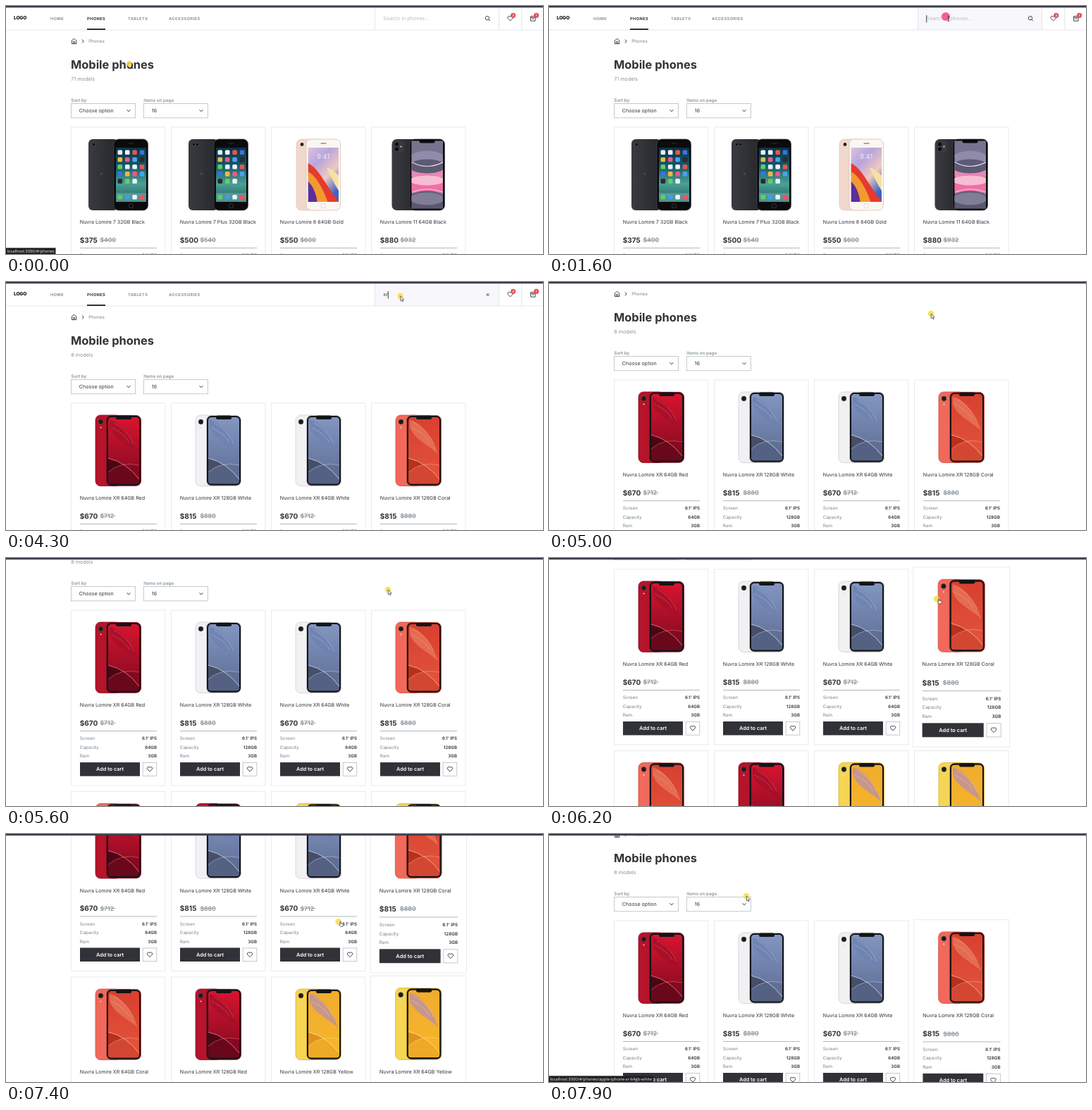
An HTML page that plays this animation: 762x352 px, repeating every 8 s.

```html
<!DOCTYPE html>
<html lang="en">
<head>
<meta charset="utf-8">
<title>Mobile phones</title>
<style>
html, body { margin: 0; width: 100%; height: 100%; overflow: hidden; background: #fff; }
svg { display: block; }
text { font-family: Inter, "Open Sans", sans-serif; fill: #313237; text-rendering: geometricPrecision; white-space: pre; }
text.status { font-family: "Open Sans", "Noto Sans", sans-serif; fill: #f2f2f2; }
</style>
</head>
<body>
<svg id="stage" width="100%" height="100%" viewBox="0 0 762 352"></svg>
<script>
const DARK = '#313237', GREY = '#89939a', PALE = '#b4bdc3', LINE = '#e2e6e9';
const BRAND = 'Nuvra Lomire';

const rect = (x, y, w, h, fill, r = 0, more = '') =>
  `<rect x="${x}" y="${y}" width="${w}" height="${h}" rx="${r}" fill="${fill}" ${more}/>`;
const box = (x, y, w, h, color) => rect(x, y, w, h, '#fff', 0, `stroke="${color}" stroke-width=".8"`);
const dot = (x, y, r, fill, more = '') => `<circle cx="${x}" cy="${y}" r="${r}" fill="${fill}" ${more}/>`;
const oval = (x, y, rx, ry, fill, more = '') =>
  `<ellipse cx="${x}" cy="${y}" rx="${rx}" ry="${ry}" fill="${fill}" ${more}/>`;
const text = (x, y, size, str, color = DARK, weight = 400, more = '') =>
  `<text x="${x}" y="${y}" font-size="${size}" font-weight="${weight}" style="fill:${color}" ${more}>${str}</text>`;
const line = (d, color = DARK, width = 1, more = '') =>
  `<path d="${d}" fill="none" stroke="${color}" stroke-width="${width}" ${more}/>`;
const shape = (d, fill, more = '') => `<path d="${d}" fill="${fill}" ${more}/>`;
const grad = (id, stops, x2 = 0, y2 = 1) =>
  `<linearGradient id="${id}" x1="0" y1="0" x2="${x2}" y2="${y2}">` +
  stops.map((c, i) => `<stop offset="${i / (stops.length - 1)}" stop-color="${c}"/>`).join('') +
  '</linearGradient>';
const group = (id, body, more = '') => `<g id="${id}" ${more}>${body}</g>`;
const screen = (x, y, w, h, body) => `<svg x="${x}" y="${y}" width="${w}" height="${h}">${body}</svg>`;
const heart = (x, y) => line(`M${x} ${y + 3.4}l-3.2-3.2a2 2 0 0 1 3.2-2.6a2 2 0 0 1 3.2 2.6z`, DARK, .9);
const chevron = (x, y) => line(`M${x - 2.4} ${y - 1.2}l2.4 2.5 2.4-2.5`, DARK, 1);

// Phone pictures, relative to the card corner
const ICONS = ['#e9f1f5', '#e4574a', '#f3b63f', '#4aa3e8', '#5fcf63', '#f4f4f4', '#3b73d9', '#e85a8b', '#2a2b30'];

function homePhone(cameras) {
  let s = rect(24.5, 17, 42, 101, 'url(#coal)', 6) + dot(43, 66, 2, '#45464c');
  for (let i = 0; i < cameras; i++) s += dot(32 + i * 5, 24.5, 2.2, '#0c0c0f', 'stroke="#55565c" stroke-width=".7"');
  s += rect(60.5, 17, 48.5, 101, '#0b0b0d', 7, 'stroke="#45464b" stroke-width=".7"');
  s += rect(63.5, 29, 43, 77, 'url(#sea)') + rect(63.5, 93.5, 43, 12.5, '#7db3ae', 0, 'opacity=".55"');
  for (let i = 0; i < 19; i++)
    s += rect(66 + i % 4 * 10.4, 32.5 + (i >> 2) * 10.2, 6.6, 6.6, ICONS[i * 5 % 9], 1.5);
  ['#58d163', '#3f9cf0', '#e9f3f8', '#ef5363'].forEach((c, i) => s += rect(66 + i * 10.4, 96, 6.6, 6.6, c, 1.5));
  return s + rect(81, 22.5, 8, 1, '#333', .5) + dot(85, 111.8, 3.1, '#0b0b0d', 'stroke="#55565c" stroke-width=".6"');
}

function goldPhone() {
  return rect(35.5, 17, 40, 101, '#f1d8cc', 7, 'stroke="#dfc2b4" stroke-width=".6"') +
    dot(43.5, 24.5, 2.4, '#222') +
    rect(49.5, 17, 48.5, 101, '#faf6f4', 7, 'stroke="#dcc0b2" stroke-width=".8"') +
    screen(52, 29, 43.5, 77, rect(0, 0, 44, 77, 'url(#rainbow)') +
      shape('M0 22C16 30 24 52 44 77H26C18 58 8 44 0 40Z', '#e73a2e') +
      shape('M0 34C12 40 22 60 28 77H12C9 62 5 54 0 50Z', '#f29a2e') +
      shape('M0 48C7 54 12 66 13 77H0Z', '#5b2f9c') +
      shape('M26 28C34 44 40 56 44 62V40C38 34 32 30 26 28Z', '#f3e3a0')) +
    text(73.7, 45, 9.5, '9:41', '#fff', 300, 'text-anchor="middle"') +
    rect(70, 22.5, 8, 1, '#555', .5) + dot(73.7, 111.8, 3.1, '#fff', 'stroke="#d9bfb2" stroke-width=".7"');
}

function widePhone() {
  return rect(29, 17, 36, 101, 'url(#coal)', 7) + rect(31.5, 19.5, 14.5, 16, '#3a3b40', 4) +
    dot(36, 24, 2.6, '#0c0c0f') + dot(36, 31, 2.6, '#0c0c0f') + dot(42, 27.5, 1.1, '#ddd') +
    rect(54.5, 17, 49.5, 101, '#0b0b0d', 7, 'stroke="#45464b" stroke-width=".7"') +
    screen(57, 19.5, 44.5, 96, rect(0, 0, 45, 96, '#8a86a3') +
      oval(22, 8, 30, 22, '#77738f') + oval(22, 26, 26, 12, '#8e8bab') +
      oval(22, 42, 30, 13, '#e58bb3') + oval(22, 36, 26, 10, '#5d5a75') +
      oval(22, 62, 30, 14, '#f06fa4') + oval(22, 56, 25, 7, '#f7bdd2') +
      oval(22, 88, 30, 17, '#5a586f') + oval(22, 82, 24, 9, '#807d98') +
      line('M0 30Q22 42 45 30M0 73Q22 64 45 73', '#e9d9e6', 1.2)) +
    rect(68, 17.5, 22, 5, '#0b0b0d', 2.5);
}

const TINTS = {
  Red: { back: '#b5142b', edge: '#8c0d20', from: '#d8142f', to: '#7c0a20', low: '#4b0615', glow: '#f0747c', mark: '#a50f28' },
  White: { back: '#f1f1f3', edge: '#cfd0d4', from: '#8296c0', to: '#5d6c93', low: '#474f68', glow: '#c9d3e6', mark: '#6e83b2' },
  Coral: { back: '#f1695a', edge: '#d04f41', from: '#d8402f', to: '#e2543c', low: '#b8301f', glow: '#f7b08f', mark: '#e8765c' },
  Yellow: { back: '#f6d555', edge: '#d9b436', from: '#f1ac2c', to: '#f6b62c', low: '#e0921c', glow: '#fbe08a', mark: '#bd90a6' }
};

function notchPhone(name) {
  const c = TINTS[name];
  return rect(34.5, 17, 36, 100.5, c.back, 7, `stroke="${c.edge}" stroke-width=".8"`) +
    dot(42, 26.5, 3.4, '#1a1a1e', 'stroke="#555" stroke-width=".6"') + dot(42, 34.5, 1, '#e8dcd0') +
    rect(50, 17.4, 49, 99.8, '#141418', 7, `stroke="${c.edge}" stroke-width=".9"`) +
    screen(52.5, 20, 44, 94.5, rect(0, 0, 44, 94.5, `url(#tint${name})`, 4.5) +
      shape('M2 4C16 6 34 26 42 52C30 40 8 32 2 14Z', c.mark, 'opacity=".8"') +
      line('M4 14C14 20 24 24 30 36M8 8C20 14 30 24 36 38', c.glow, .8, 'opacity=".5"') +
      shape('M0 58Q26 64 44 88V90Q44 94.5 39.5 94.5H4.5Q0 94.5 0 90Z', c.low) +
      shape('M0 78Q18 62 44 68V90Q44 94.5 39.5 94.5H4.5Q0 94.5 0 90Z', c.to, 'opacity=".65"') +
      line('M0 58Q26 64 44 88', c.glow, .9) + line('M0 78Q18 62 44 68', c.glow, .7, 'opacity=".7"')) +
    rect(63.5, 17.6, 22, 5.4, '#141418', 2.5);
}

// Cards
function card(id, col, row, picture, name, price, old, memory) {
  let s = box(0, 0, 133.5, 249, LINE) + picture + text(12.3, 137, 7.1, `${BRAND} ${name}`) +
    text(12.3, 163.7, 10, '$' + price, DARK, 700) + text(41, 163.2, 8.6, '$' + old, GREY, 600) +
    line('M41 160.1h22', GREY, .8) + line('M12.5 171.5h109', '#abaeb4', .9);
  [['Screen', "6.1' IPS"], ['Capacity', memory], ['Ram', '3GB']].forEach(([label, value], i) => {
    const y = 184.4 + i * 12.3;
    s += text(12.3, y, 6.3, label, GREY, 500) + text(121.5, y, 6.2, value, DARK, 600, 'text-anchor="end"');
  });
  s += rect(12.5, 216, 85, 19.5, DARK) + text(55, 228.2, 7.3, 'Add to cart', '#fff', 600, 'text-anchor="middle"') +
    box(101.7, 216.4, 19.6, 18.8, PALE) + heart(111.5, 225.6);
  return `<g transform="translate(${92.5 + col * 142} ${172 + row * 257.5})">${group(id, s)}</g>`;
}

const allPhones = [
  [homePhone(1), '7 32GB Black', 375, 400, '32GB'],
  [homePhone(2), '7 Plus 32GB Black', 500, 540, '32GB'],
  [goldPhone(), '8 64GB Gold', 550, 600, '64GB'],
  [widePhone(), '11 64GB Black', 880, 932, '64GB']
].map((p, i) => card('all' + i, i, 0, ...p)).join('');

const found = [['Red', 64], ['White', 128], ['White', 64], ['Coral', 128],
  ['Coral', 64], ['Red', 128], ['Yellow', 128], ['Yellow', 64]]
  .map(([color, gb], i) => card('hit' + i, i % 4, i >> 2, notchPhone(color),
    `XR ${gb}GB ${color}`, gb > 64 ? 815 : 670, gb > 64 ? 880 : 712, gb + 'GB')).join('');

// Page parts
const badge = (x, n) => dot(x, 13.3, 3.6, '#eb4b57') +
  text(x, 15, 4.6, n, '#fff', 600, 'text-anchor="middle"');

const header = group('field', rect(523.5, 2, 176, 32, '#f8f7fb')) +
  line('M0 34h762M523.5 2v32M699.5 2v32M731.8 2v32', LINE, 1) +
  text(11, 18.6, 6.7, 'LOGO', '#111', 800, 'letter-spacing="-.2"') +
  [[63, 'HOME'], [115, 'PHONES'], [173, 'TABLETS'], [231, 'ACCESSORIES']].map(([x, s]) =>
    text(x, 19.6, 5.7, s, x === 115 ? DARK : GREY, 700, 'letter-spacing=".4"')).join('') +
  rect(115, 32, 26, 2, DARK) +
  group('hint', text(535.3, 20.4, 7.2, 'Search in phones...', PALE)) +
  text(535.3, 20.4, 7.2, '', DARK, 400, 'id="query"') +
  group('caret', rect(0, 13, .9, 10.5, DARK)) +
  group('lens', dot(683, 17.2, 2.7, 'none', `stroke="${DARK}" stroke-width=".9"`) + line('M685 19.2l2 2', DARK, .9)) +
  group('clear', line('M681.6 16.1l3.9 3.9M685.5 16.1l-3.9 3.9', DARK, .9)) +
  heart(715.6, 17.6) + badge(719.7, '3') +
  line('M744.6 14.6h6.4v6.6h-6.4zM744.6 16.4h6.4M746.4 17.6q1.4 1.8 2.8 0', DARK, .9) + badge(752.6, '1');

const top_ = line('M93.4 49l3.2-2.7 3.2 2.7v4.6h-6.4zM95.6 53.4v-2.8h2v2.8', DARK, .9) +
  line('M108 47.6l2.2 2.4-2.2 2.4', DARK, 1) +
  text(117.3, 52.1, 6.3, 'Phones', GREY, 500) +
  text(92, 89.2, 16.4, 'Mobile phones', DARK, 700) +
  text(92.3, 106, 7.2, '', GREY, 400, 'id="count"') +
  text(92.3, 135.6, 6.3, 'Sort by', GREY, 600) + text(195.3, 135.6, 6.3, 'Items on page', GREY, 600) +
  box(92.5, 138.4, 91, 20.4, PALE) + text(103.8, 150.6, 7.1, 'Choose option') + chevron(174, 148.5) +
  box(195.3, 138.4, 91, 20.4, PALE) + text(206.8, 150.6, 7.1, '16') + chevron(277, 148.5);

const CURSOR = `stroke="${DARK}" stroke-width=".7" stroke-linejoin="round"`;
const pointer = dot(0, 0, 4.2, '#f8dc3c', 'id="spot" opacity=".85"') +
  group('arrow', shape('M.3 0v6.8l1.6-1.4 1.1 2.4 1.1-.5-1-2.3h2.1z', '#fff', CURSOR)) +
  group('beam', line('M2.6 0h2.8M4 0v6.4M2.6 6.4h2.8', DARK, .8)) +
  group('hand', shape('M2.6 0q.9-.6 1.2.4v2l2.6.6q.9.3.7 1.3l-.5 2.6h-3.4l-2.2-2.8q.3-.9 1.6 0z', '#fff', CURSOR));

const stage = document.getElementById('stage');
stage.innerHTML = '<defs>' +
  grad('coal', ['#3a3b40', '#26272b'], 1, 0) +
  grad('sea', ['#0b3246', '#15586a', '#4ba093', '#1f5f66']) +
  grad('rainbow', ['#d9c3e0', '#b9a4dc', '#f0c9c0', '#3f63c4'], .6, 1) +
  Object.entries(TINTS).map(([k, c]) => grad('tint' + k, [c.from, c.to])).join('') + '</defs>' +
  rect(0, 0, 762, 352, '#fff') +
  group('page', header + top_ + group('before', allPhones) + group('after', found)) +
  rect(0, 0, 762, 2.2, '#3b3c49') +
  group('status', rect(0, 343.3, 0, 8.7, '#1f2023', 0, 'id="plate"') +
    text(1.5, 350, 5.8, '', '#f2f2f2', 400, 'class="status" id="link"')) +
  group('pointer', pointer);

// Motion tables: time, values...
const SCROLL = [[4900, 0], [5000, 33], [6100, 152], [6300, 160], [6900, 337], [7000, 341], [7100, 333], [7900, 49]];
const MOUSE = [[0, 175, 82], [200, 190, 80], [1300, 560, 17], [1500, 563, 15], [4200, 563, 15], [4800, 542, 45],
  [5600, 542, 45], [6200, 550, 58], [6800, 566, 131.5], [7100, 566, 131.5], [7500, 440, 122], [7900, 280, 88]];
const HOVER = {
  hit3: [[6000, 1], [6200, 1.025], [6300, 1.04], [6700, 1.04], [7000, 1.01], [7100, 1],
    [7300, 1], [7500, 1.04], [7600, 1.04], [7900, 1.01]],
  hit7: [[6700, 1], [7000, 1.04], [7200, 1.04], [7500, 1]]
};
const KINDS = [[0, 'beam'], [200, 'arrow'], [1300, 'beam'], [4300, 'arrow'], [6000, 'hand'], [7700, 'arrow']];
const QUERY = [[0, ''], [2800, 'x'], [3100, 'xr']];
const CARET = [[0, 0], [1500, 1], [2000, 0], [2500, 1], [3600, 0], [4200, 1], [4700, 0]];
const LINKS = [[0, 'localhost:3000/#/phones'], [500, ''], [7500, 'localhost:3000/#/phones/apple-iphone-xr-64gb-white']];

const el = id => document.getElementById(id);
const show = (id, on) => { el(id).style.display = on ? '' : 'none'; };
const pick = (table, t) => table.filter(k => k[0] <= t).pop()[1];

function tween(table, t) {
  const i = table.findIndex(k => k[0] > t);
  if (i < 0) return table[table.length - 1].slice(1);
  if (i === 0) return table[0].slice(1);
  const a = table[i - 1], b = table[i], p = (t - a[0]) / (b[0] - a[0]);
  return a.slice(1).map((v, n) => v + (b[n + 1] - v) * p);
}

function draw(t) {
  const done = t >= 4200, query = pick(QUERY, t), link = pick(LINKS, t);
  el('page').setAttribute('transform', `translate(0 ${-tween(SCROLL, t)[0]})`);
  show('before', !done);
  show('after', done);
  el('count').textContent = done ? '8 models' : '71 models';

  show('field', t >= 1300 && t < 4500);
  show('hint', !query);
  show('lens', !query);
  show('clear', query);
  show('caret', pick(CARET, t));
  el('query').textContent = query;
  el('caret').setAttribute('transform', `translate(${[535.3, 539.2, 541.8][query.length]} 0)`);

  for (const id in HOVER) {
    const s = tween(HOVER[id], t)[0];
    el(id).setAttribute('transform', `translate(66.75 124.5) scale(${s}) translate(-66.75 -124.5)`);
  }

  show('status', link);
  el('link').textContent = link;
  el('plate').setAttribute('width', link.length > 30 ? 148 : 70.5);

  const kind = pick(KINDS, t), click = t >= 1500 && t < 1800;
  el('pointer').setAttribute('transform', `translate(${tween(MOUSE, t).join(' ')})`);
  for (const k of ['arrow', 'beam', 'hand']) show(k, k === kind);
  el('spot').setAttribute('r', click ? 6 : 4.2);
  el('spot').setAttribute('fill', click ? '#f2457f' : '#f8dc3c');
}

const start = performance.now();
function tick(now) {
  const t = Math.max(0, now - start) % 8000;
  draw(Math.floor(t / 100) * 100);
  requestAnimationFrame(tick);
}
draw(0);
requestAnimationFrame(tick);
</script>
</body>
</html>
```
